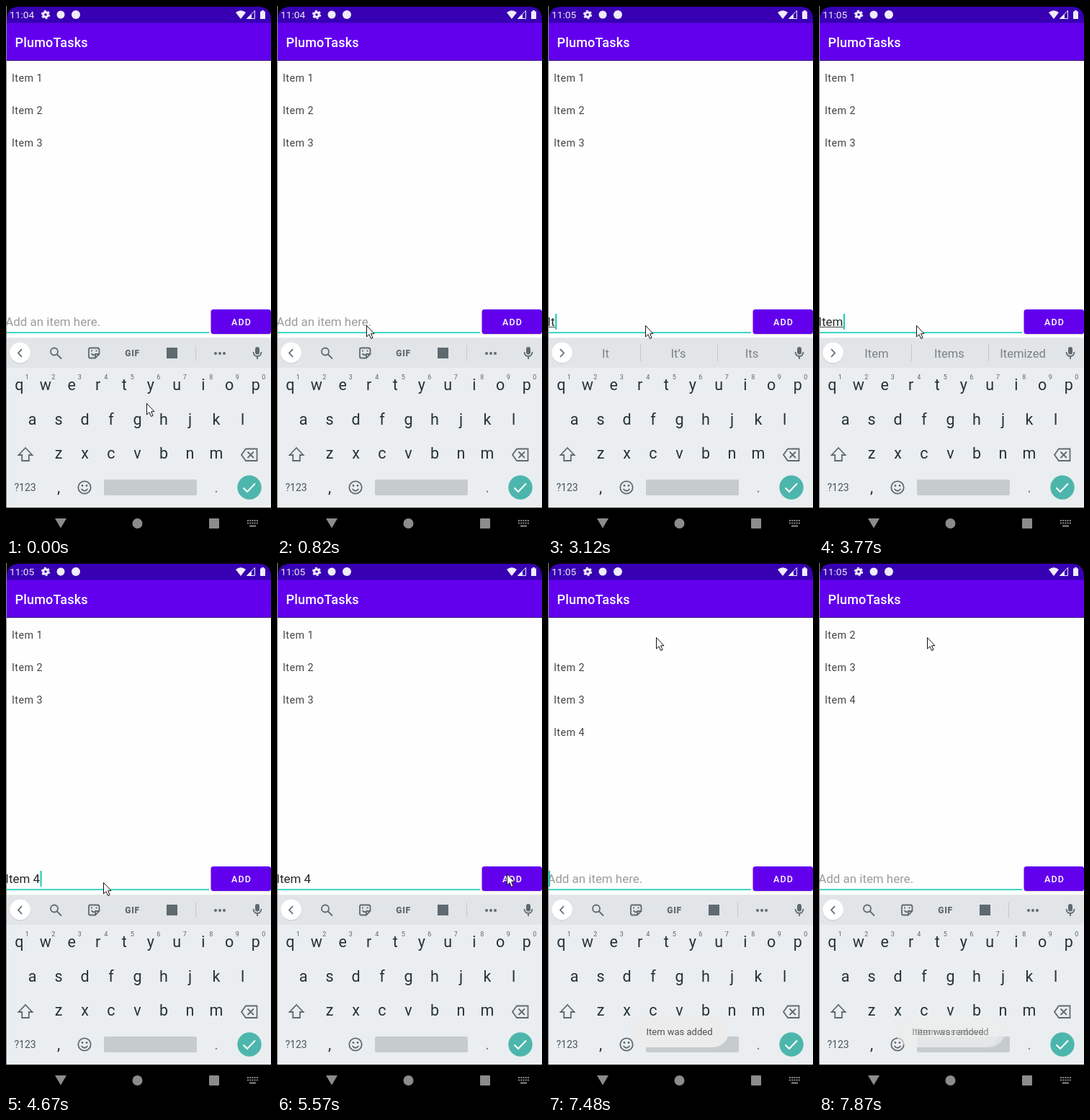
Write an HTML page that moves like this. It is 368x734 px and loops after 8 s.

```html
<!DOCTYPE html>
<html lang="en">
<head>
<meta charset="utf-8">
<title>To-do list</title>
<style>
  html, body { margin: 0; width: 100%; height: 100%; overflow: hidden; background: #000; }
  svg { display: block; width: 100vw; height: 100vh; font-family: Roboto, "Noto Sans", sans-serif; }
  text { white-space: pre; }
  .item { font-size: 14.3px; letter-spacing: .44px; fill: #434343; }
  .field { font-size: 16.9px; }
  .key { font-size: 21.5px; fill: #263238; text-anchor: middle; }
  .hint { font-size: 9px; fill: #5b666c; text-anchor: middle; }
  .word { font-size: 16.6px; fill: #7b8185; text-anchor: middle; }
  .toast { font-size: 13px; fill: #505050; text-anchor: middle; }
  .line { fill: none; stroke: #5f6a70; stroke-width: 1.8; }
  .ink { fill: #5f6a70; }
</style>
</head>
<body>
<svg id="stage" viewBox="0 0 368 734" preserveAspectRatio="none">
  <defs>
    <clipPath id="btn"><rect x="284.5" y="421" width="83.5" height="34" rx="3.5"/></clipPath>
  </defs>
  <rect width="368" height="734"/>

  <!-- status bar and title -->
  <path d="M1 24V19Q1 1 19 1H350Q368 1 368 19V24Z" fill="#3700b3"/>
  <g fill="#f1ecfa">
    <text id="clock" x="5" y="17" font-size="13.7"></text>
    <circle cx="55" cy="12" r="3.3" fill="none" stroke="#f1ecfa" stroke-width="3"/>
    <circle cx="55" cy="12" r="5.3" fill="none" stroke="#f1ecfa" stroke-width="1.8" stroke-dasharray="2.8 2.75"/>
    <circle cx="76" cy="12" r="5.5"/>
    <circle cx="97" cy="12" r="6"/>
    <path d="M319 9Q326 3.5 333 9L326 18Z"/>
    <path d="M345.5 6.5V17.5H334.5Z" fill="none" stroke="#f1ecfa"/>
    <path d="M341 11.5V18H334Z"/>
    <path d="M353 7.5H355V6H358V7.5H360V18H353Z"/>
  </g>
  <rect x="1" y="76" width="367" height="385" fill="#fefefe"/>
  <rect x="1" y="23.5" width="367" height="52" fill="#6200ee"/>
  <text x="12.5" y="57" font-size="18" font-weight="500" letter-spacing=".2" fill="#fff">PlumoTasks</text>

  <!-- list and input -->
  <g id="list"></g>
  <text id="typed" class="field" x="-.7" y="444"></text>
  <rect id="under" y="445" height="1" fill="#444"/>
  <rect x="1" y="452.3" width="281" height="1.8" fill="#27cfbd"/>
  <rect id="caret" y="427" width="2" height="22" fill="#10cdb9"/>
  <rect x="285" y="422" width="83" height="34" rx="3.5" opacity=".16"/>
  <g clip-path="url(#btn)">
    <rect x="284" y="421" width="84" height="34" fill="#6200ee"/>
    <circle id="ripple" cx="320" cy="432" fill="#fff"/>
  </g>
  <text x="327" y="443" font-size="12.5" font-weight="500" letter-spacing="1.1" fill="#fff" text-anchor="middle">ADD</text>

  <!-- keyboard -->
  <rect x="1" y="460.5" width="367" height="235.5" fill="#eaeef0"/>
  <rect x="1" y="460.5" width="367" height="41.5" fill="#e1e5e8"/>
  <circle cx="19.5" cy="482" r="14.5" fill="#b9bfc3" opacity=".5"/>
  <circle cx="19.5" cy="481" r="14.3" fill="#fff"/>
  <path id="chevron" class="line" d="M2.5 -5.5L-2.5 0L2.5 5.5"/>
  <g id="tools">
    <circle class="line" cx="67" cy="479.5" r="5"/>
    <path class="line" d="M70.5 483L77 489.5"/>
    <path class="line" d="M117 474.5H127Q129.5 474.5 129.5 477V483L124 488.5H117Q115 488.5 115 486.5V476.5Q115 474.5 117 474.5ZM124 488V483H129M118.5 482Q120.5 485 123 484M119 477.5V479.5M125.5 477.5V479.5"/>
    <text class="ink" x="175.5" y="485.5" font-size="12" font-weight="900" letter-spacing=".7" text-anchor="middle">GIF</text>
    <rect class="ink" x="223" y="474" width="15" height="15"/>
    <rect x="263" y="471" width="1" height="21" fill="#c4c9cc"/>
    <path class="line" d="M291 482h0M297 482h0M303 482h0" style="stroke-width:4;stroke-linecap:round"/>
  </g>
  <g id="words">
    <path d="M128.5 470V493M235.5 470V493" stroke="#c1c6c9"/>
  </g>
  <rect class="ink" x="346" y="473" width="6" height="10.5" rx="3"/>
  <path class="line" d="M343.5 480Q344 486 349 486T354.5 480M349 486V490"/>
  <g id="keys"></g>
  <path class="line" d="M27 613L36.5 623H31.8V631H22.2V623H17.5Z"/>
  <path class="line" d="M333 614.5H348.5V631H333L327 622.8ZM335.5 618.5L344 627M344 618.5L335.5 627"/>
  <text x="11.5" y="673" font-size="14" fill="#4b565c">?123</text>
  <text class="key" x="73" y="675">,</text>
  <text class="key" x="292" y="675" style="fill:#7b8489">.</text>
  <circle class="line" cx="109" cy="668" r="8.7"/>
  <circle class="ink" cx="106" cy="665.5" r="1.4"/>
  <circle class="ink" cx="112" cy="665.5" r="1.4"/>
  <path class="line" d="M104.5 670Q109 675.5 113.5 670"/>
  <rect x="136" y="657" width="129" height="22" rx="2" fill="#c6cbce"/>
  <circle cx="338" cy="668" r="16.7" fill="#4db6ac"/>
  <path d="M329.5 668.5L335 674L346 662.5" fill="none" stroke="#fff" stroke-width="2"/>

  <!-- navigation bar -->
  <g fill="#8c8c8c">
    <path d="M68 711H84L76 724.5Z"/>
    <circle cx="182.5" cy="718" r="7"/>
    <rect x="282" y="711" width="14" height="14" rx="1"/>
  </g>
  <path d="M335 714H350M335 717.5H350" stroke="#8c8c8c" stroke-width="2" stroke-dasharray="2 1.2"/>
  <path d="M338 721.5H347" stroke="#8c8c8c" stroke-width="2"/>
  <path d="M.5 0V696" stroke="#8a8a8a"/>

  <g id="pills"></g>
  <g id="notes"></g>
  <path id="mouse" d="M.5 .5V16L4 12.7L6.5 18.5L9 17.4L6.6 11.7H11Z" fill="#fff" stroke="#111" stroke-linejoin="round"/>
</svg>

<script>
const LOOP = 8000, ADD_AT = 5810, REMOVE_AT = 7480;
const TEXT = "Item 4";
const KEY_TIMES = [2860, 3120, 3620, 3770, 4020, 4670];
const SUGGEST = {
  I: ["I", "I’m", "I’ll"],
  It: ["It", "It’s", "Its"],
  Item: ["Item", "Items", "Itemized"],
  "Item ": ["is", "number", "and"]
};
SUGGEST.Ite = SUGGEST.It;

// Pointer legs: from time, to time, end point
const LEGS = [
  [250, 430, 129, 475], [520, 820, 124, 443], [1150, 1310, 135, 443],
  [5150, 5500, 319, 431], [5870, 6050, 158, 211], [6050, 6830, 150, 103]
];

const $ = id => document.getElementById(id);
const ramp = (t, a, b) => Math.min(1, Math.max(0, (t - a) / (b - a)));
const easeOut = p => 1 - (1 - p) ** 2;
const smooth = p => p * p * (3 - 2 * p);

function set(el, attrs) {
  for (const k in attrs) el.setAttribute(k, attrs[k]);
}

function add(parent, tag, attrs, text = "") {
  const el = document.createElementNS("http://www.w3.org/2000/svg", tag);
  set(el, attrs);
  el.textContent = text;
  $(parent).append(el);
  return el;
}

const items = [1, 2, 3, 4].map(n => add("list", "text", { class: "item", x: 8 }, "Item " + n));
const words = [80, 181, 283].map(x => add("words", "text", { class: "word", x, y: 488 }));

["qwertyuiop", "asdfghjkl", "zxcvbnm"].forEach((row, r) => {
  [...row].forEach((c, i) => {
    const x = 182.5 + (i - (row.length - 1) / 2) * 36.5;
    add("keys", "text", { class: "key", x, y: 533 + r * 47.7 }, c);
    if (!r) add("keys", "text", { class: "hint", x: x + 11, y: 518 }, (i + 1) % 10);
  });
});

function makeToast(text, w) {
  const pill = add("pills", "rect", { x: 182.5 - w / 2, y: 628, width: w, height: 44, rx: 22, fill: "#ececec" });
  const note = add("notes", "text", { class: "toast", x: 182.5, y: 655 }, text);
  return opacity => [pill, note].forEach(el => set(el, { opacity }));
}
const showAdded = makeToast("Item was added", 137);
const showRemoved = makeToast("Item was removed", 151);

function mouseAt(t) {
  let x = 195, y = 551;
  for (const [a, b, toX, toY] of LEGS) {
    const p = easeOut(ramp(t, a, b));
    x += (toX - x) * p;
    y += (toY - y) * p;
  }
  return [x, y];
}

// The blink restarts with every keystroke.
function caretOn(t, lastKey) {
  const from = t >= ADD_AT ? 6200 : lastKey || 290;
  return +(Math.floor((t - from) / 505) % 2 === 0);
}

function drawField(t) {
  const pressed = KEY_TIMES.filter(k => k <= t);
  const text = t < ADD_AT ? TEXT.slice(0, pressed.length) : "";
  const typed = $("typed");
  typed.textContent = text || "Add an item here.";
  set(typed, { fill: text ? "#252525" : "#9c9c9c" });

  const x = text ? typed.getComputedTextLength() : 1;
  const list = SUGGEST[text] || [], open = list.length > 0;
  set($("caret"), { x, opacity: caretOn(t, pressed.at(-1)) });
  set($("under"), { width: open && !text.endsWith(" ") ? x : 0 });

  words.forEach((el, i) => el.textContent = list[i] || "");
  set($("words"), { opacity: +open });
  set($("tools"), { opacity: +!open });
  set($("chevron"), { transform: `translate(19.5 481.5) scale(${open ? -1 : 1} 1)` });
}

function draw(t) {
  $("clock").textContent = t < 2710 ? "11:04" : "11:05";
  drawField(t);

  const shift = 45 * smooth(ramp(t, 7540, 7860));
  items.forEach((el, i) => set(el, { y: 104.5 + i * 45 - (i ? shift : 0) }));
  set(items[0], { opacity: +(t < REMOVE_AT) });
  set(items[3], { opacity: ramp(t, ADD_AT - 60, ADD_AT + 100) });

  const press = ramp(t, 5650, 6040);
  set($("ripple"), { r: 70 * easeOut(press), opacity: .22 * (1 - press) });
  showAdded(ramp(t, 5880, 6090) * (1 - ramp(t, 7640, 8100)));
  showRemoved(ramp(t, 7660, 7990));
  set($("mouse"), { transform: `translate(${mouseAt(t)})` });
}

const start = performance.now();
function tick() {
  draw((performance.now() - start) % LOOP);
  requestAnimationFrame(tick);
}
tick();
</script>
</body>
</html>
```
